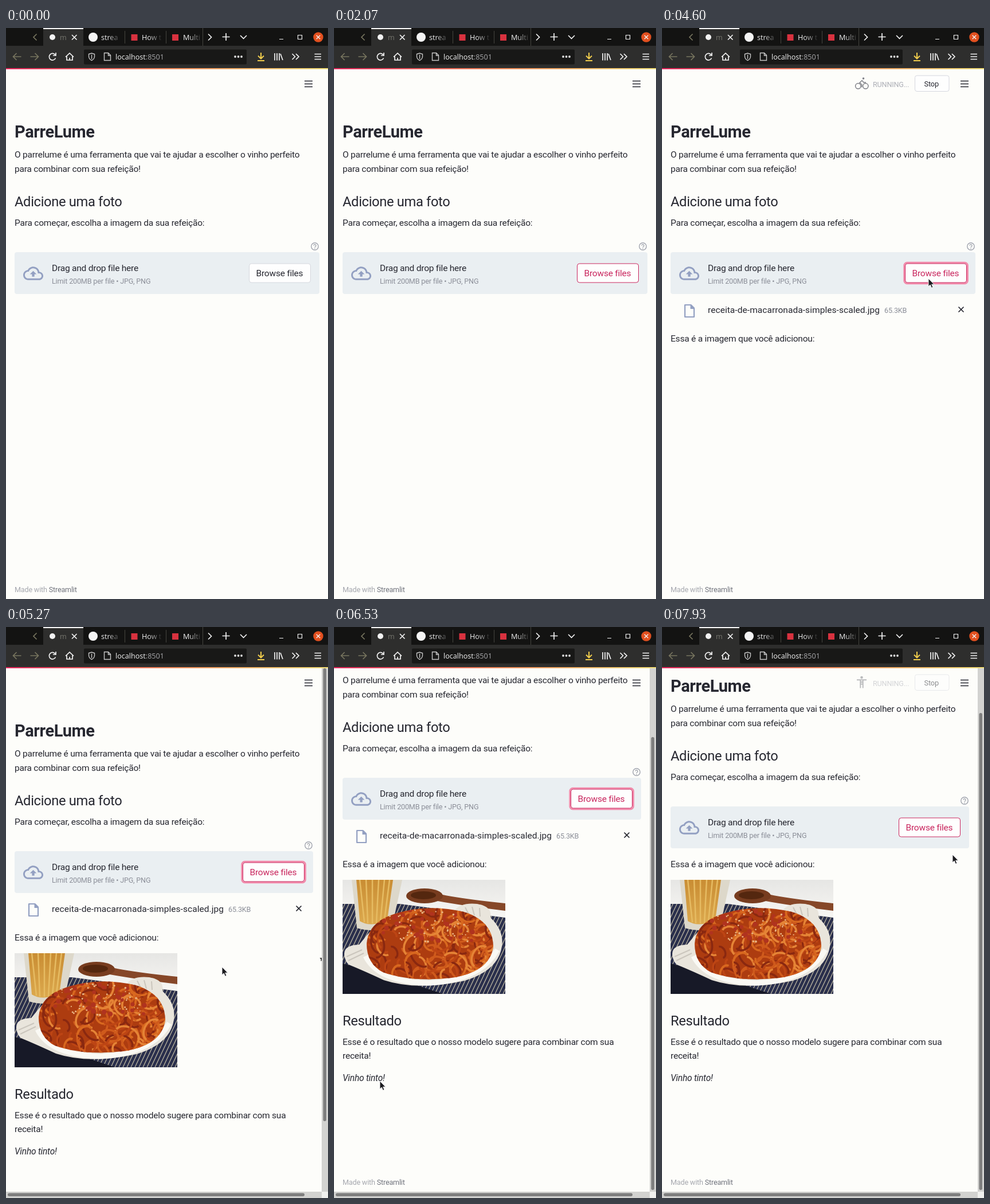
Animation, 562 px wide and 996 px high, one loop 8 s. Source, as an HTML page:

```html
<!DOCTYPE html>
<html lang="pt">
<head>
<meta charset="utf-8">
<title>ParreLume</title>
<style>
html, body { margin: 0; width: 100%; height: 100%; overflow: hidden; background: #fdfdfa; }
svg.stage { display: block; width: 100vw; height: 100vh; }
text { font: 15.5px Roboto, "Liberation Sans", sans-serif; letter-spacing: -.014em; fill: #262730; white-space: pre; }
.h1 { font-size: 29px; font-weight: 700; }
.h2 { font-size: 23.7px; }
.file { letter-spacing: .004em; }
.small { font-size: 12.6px; fill: #8b8e98; }
.ui { font: 12.6px "Open Sans", "Noto Sans", sans-serif; letter-spacing: 0; fill: #f2f2f2; }
.line { fill: none; stroke: #f2f2f2; stroke-width: 1.7; }
.dim { stroke: #77755f; }
.hot #btn rect { stroke: #c9265e; }
.hot #btn text { fill: #c9265e; }
</style>
</head>
<body>
<svg class="stage" viewBox="0 0 562 996" preserveAspectRatio="none">
  <defs>
    <linearGradient id="glow"><stop stop-color="#e8275f"/><stop offset=".5" stop-color="#f58a5c"/><stop offset="1" stop-color="#f3df78"/></linearGradient>
    <linearGradient id="fade"><stop stop-color="#131312" stop-opacity="0"/><stop offset="1" stop-color="#131312"/></linearGradient>
    <linearGradient id="wall" x2="0" y2="1"><stop stop-color="#e6e6e4"/><stop offset=".3" stop-color="#f6f5f2"/></linearGradient>
    <linearGradient id="noodles" x2="0" y2="1"><stop stop-color="#c98d33"/><stop offset="1" stop-color="#dca94e"/></linearGradient>
    <clipPath id="frame"><rect width="284" height="199"/></clipPath>
    <clipPath id="heap"><path d="M42 112Q44 74 92 59Q150 41 212 56Q262 72 263 116Q258 160 190 171Q120 179 70 161Q42 146 42 112Z"/></clipPath>
    <clipPath id="mat"><path d="M0 42H100L284 66V199H0Z"/></clipPath>
  </defs>
  <rect width="562" height="996" fill="#fdfdfa"/>

  <g id="page">
    <text class="h1" x="15" y="191">ParreLume</text>
    <text x="15" y="226">O parrelume é uma ferramenta que vai te ajudar a escolher o vinho perfeito</text>
    <text x="15" y="250.5">para combinar com sua refeição!</text>
    <text class="h2" x="15" y="311">Adicione uma foto</text>
    <text x="15" y="345">Para começar, escolha a imagem da sua refeição:</text>
    <rect id="zone" x="15" y="391" width="532" height="73" rx="4" fill="#eaeff2"/>
    <path transform="translate(30 410.5) scale(1.46)" fill="#93a0c2" d="M19.35 10.04C18.67 6.59 15.64 4 12 4 9.11 4 6.6 5.64 5.35 8.04 2.34 8.36 0 10.91 0 14c0 3.31 2.69 6 6 6h13c2.76 0 5-2.24 5-5 0-2.64-2.05-4.78-4.65-4.96zM19 18H6c-2.21 0-4-1.79-4-4s1.79-4 4-4h.71C7.37 7.69 9.48 6 12 6c3.04 0 5.5 2.46 5.5 5.5v.5H19c1.66 0 3 1.34 3 3s-1.34 3-3 3zM8 13h2.55v3h2.9v-3H16l-4-4z"/>
    <text x="80" y="424">Drag and drop file here</text>
    <text class="small" x="80" y="446">Limit 200MB per file • JPG, PNG</text>
    <g id="side">
      <circle cx="539" cy="381" r="6.2" fill="none" stroke="#a0a4ae" stroke-width="1.4"/>
      <path d="M537 379.6a2 2 0 1 1 3.2 1.6q-1.2 .8-1.2 1.8M539 384v1.4" fill="none" stroke="#a0a4ae" stroke-width="1.3"/>
      <rect id="ring" x="422.8" y="409.3" width="110.6" height="36.4" rx="5" fill="none" stroke="#f28bab" stroke-width="3"/>
      <g id="btn">
        <rect x="424.5" y="411" width="107" height="33" rx="4" fill="#fefefe" stroke="#d5d7de"/>
        <text x="436.5" y="433">Browse files</text>
      </g>
    </g>
    <g id="row">
      <path d="M40 483H50.5L56 488.5V504H40Z" fill="none" stroke="#93a0c2" stroke-width="2.2" stroke-linejoin="round"/>
      <path d="M49.5 482.5V490H57Z" fill="#93a0c2"/>
      <text class="file" x="80" y="497">receita-de-macarronada-simples-scaled.jpg</text>
      <text class="small" x="388" y="496.5">65.3KB</text>
      <path id="drop" d="M517.5 486.5l9 9m0-9l-9 9" stroke="#262730" stroke-width="1.7"/>
    </g>
    <g id="after">
      <text id="added" x="15" y="546.5">Essa é a imagem que você adicionou:</text>
      <g id="photo" transform="translate(15 569)" clip-path="url(#frame)">
        <rect width="284" height="199" fill="url(#wall)"/>
        <g clip-path="url(#mat)"><rect width="284" height="199" fill="#2a2f4c"/><g id="slats" stroke="#b9b4a0" stroke-width="1.3"/></g>
        <path d="M0 146L40 156L130 184L175 199H0Z" fill="#171927"/>
        <path d="M16 0H104L86 84Q50 92 25 84Z" fill="#ddd8ca"/>
        <path d="M24 0H88L78 70Q50 84 30 72Z" fill="url(#noodles)"/>
        <path d="M30 0L38 74M41 0L44 76M52 0V76M63 0L59 75M73 0L66 73M82 0L73 70" stroke="#e6bb62" stroke-width="2.5"/>
        <path d="M165 24Q205 33 284 41V54Q215 46 160 36Z" fill="#864728"/>
        <ellipse cx="143" cy="28" rx="32" ry="13" fill="#773c1f"/>
        <ellipse cx="141" cy="27" rx="22" ry="7" fill="#54270f"/>
        <path d="M3 130Q2 114 29 113L43 96Q82 50 195 54Q206 39 235 42Q262 47 258 66Q282 88 278 116Q272 158 213 176Q130 194 72 175Q40 160 11 148Q4 142 3 130Z" fill="#e9e5dc"/>
        <path d="M40 133Q62 178 150 180Q240 176 270 122" fill="none" stroke="#faf9f4" stroke-width="9"/>
        <path d="M7 134L34 122M10 141L37 128M214 48L220 60M226 47L230 62M239 49L240 64" stroke="#cbc6bd" stroke-width="2"/>
        <g clip-path="url(#heap)"><rect width="284" height="199" fill="#ad3c10"/><g id="pasta" fill="none"/></g>
      </g>
      <g id="result">
        <text class="h2" x="15" y="823">Resultado</text>
        <text x="15" y="857">Esse é o resultado que o nosso modelo sugere para combinar com sua</text>
        <text x="15" y="880.5">receita!</text>
        <text x="15" y="920" style="font-style:italic">Vinho tinto!</text>
      </g>
    </g>
    <path id="speck" d="M547.5 577h3.5v5l-1.5 1v-3.5z" fill="#333"/>
    <text class="small" id="foot" x="15" y="984" style="fill:#a5a7ae">Made with <tspan fill="#71747d">Streamlit</tspan></text>
  </g>

  <g id="bars">
    <path d="M551 72H562V996H0V985H551Z" fill="#d2d2d0"/>
    <rect x="551" y="985" width="11" height="11" fill="#f0f0ee"/>
    <rect id="thumb" x="553.5" y="72" width="5.5" height="790" rx="2.7" fill="#7e7e7e"/>
    <rect x="3" y="987.5" width="518" height="5.5" rx="2.7" fill="#7e7e7e"/>
  </g>

  <path d="M521 92.5H535M521 97.5H535M521 102.5H535" stroke="#262730" stroke-width="1.7"/>
  <g id="run">
    <g id="bike" fill="none" stroke="#7d7f86" stroke-width="1.5">
      <circle cx="342.3" cy="101.3" r="4.7"/><circle cx="355.3" cy="101.3" r="4.7"/>
      <path d="M348.6 103.5V98.5L345 95.5L349 91.5L352 95H356"/>
      <circle cx="351.5" cy="88" r="1.8" fill="#7d7f86" stroke="none"/>
    </g>
    <g id="man" fill="none" stroke="#7d7f86" stroke-width="1.9">
      <circle cx="348.5" cy="88" r="2.3" fill="#7d7f86" stroke="none"/>
      <path d="M340 92.3H357M346.3 92V106.5M350.7 92V106.5M346.3 96H350.7M346.3 99.5H350.7"/>
    </g>
    <text class="small" x="368" y="103" style="fill:#adafb6">RUNNING...</text>
    <rect x="441.5" y="83" width="59.5" height="27.5" rx="3.5" fill="#fefefe" stroke="#d5d7de"/>
    <text x="457.5" y="101.5" style="font-size:12.8px">Stop</text>
  </g>

  <g id="chrome">
    <rect width="562" height="31" fill="#131312"/>
    <rect y="31" width="562" height="39" fill="#2e2e2d"/>
    <rect x="65" width="70" height="31" fill="#2e2e2d"/>
    <rect x="65" width="70" height="2" fill="#f4f4f4"/>
    <rect y="70" width="562" height="2" fill="url(#glow)"/>
    <rect x="136" y="37.5" width="284" height="26" rx="2" fill="#181817"/>
    <path class="line dim" d="M53.5 10.5L48 16L53.5 21.5"/>
    <circle cx="81" cy="16" r="5" fill="#f2f2f2"/>
    <text class="ui" x="94" y="20.5" style="fill:#77776f">m</text>
    <path class="line" d="M115 12l8.5 8.5m0-8.5l-8.5 8.5"/>
    <circle cx="152" cy="16" r="8" fill="#f4f4f4"/>
    <text class="ui" x="166" y="20.5">strea</text>
    <rect x="177" y="5" width="24" height="22" fill="url(#fade)"/>
    <rect x="218.5" y="11" width="11" height="11" fill="#d8323f"/>
    <text class="ui" x="237" y="20.5">How t</text>
    <rect x="248" y="5" width="25" height="22" fill="url(#fade)"/>
    <rect x="290" y="11" width="11" height="11" fill="#d8323f"/>
    <text class="ui" x="309" y="20.5">Multi</text>
    <rect x="319" y="5" width="24" height="22" fill="url(#fade)"/>
    <path d="M207.5 5V27M279.5 5V27M343.5 0V31" stroke="#45453f"/>
    <path class="line" d="M353 10.5L358.5 16L353 21.5M377.5 15.5H390.5M384 9V22M409 13L414.5 18.5L420 13"/>
    <path class="line" d="M477 19.5H484M509.5 12.5H516.5V19.5H509.5Z" style="stroke-width:1.2"/>
    <circle cx="545" cy="16" r="8.7" fill="#e2501f"/>
    <path class="line" d="M541.7 12.7l6.6 6.6m0-6.6l-6.6 6.6" style="stroke-width:1.4"/>
    <path class="line dim" d="M26.5 50H12.5M18.5 44L12.5 50L18.5 56M42.5 50H56.5M50.5 44L56.5 50L50.5 56"/>
    <path class="line" d="M86 47A5.8 5.8 0 1 0 86.5 52.5M87 43V48H82M104 50.5L111 44L118 50.5M106 49.5V56H116V49.5M111 56V52"/>
    <path class="line" d="M144.5 45.5L149.5 44L154.5 45.5V50Q154 54.5 149.5 56.5Q145 54.5 144.5 50ZM149.5 46.5V54" style="stroke:#c6c6c6;stroke-width:1.4"/>
    <path class="line" d="M171.5 43.5H178.5L182.5 47.5V56.5H171.5ZM178.5 44V48H182" style="stroke:#c6c6c6;stroke-width:1.4"/>
    <text class="ui" x="191" y="55">localhost<tspan fill="#a8a8ab">:8501</tspan></text>
    <path d="M400 50h.01M405.5 50h.01M411 50h.01" stroke="#ddd" stroke-width="3.8" stroke-linecap="round"/>
    <path class="line" d="M445 43V53M440 48.5L445 53.5L450 48.5M439 57H451" style="stroke:#f0cc4c;stroke-width:2"/>
    <path class="line" d="M469 44V56.5M473 44V56.5M477 44V56.5M479 45L483 56M499.5 45L504.5 50L499.5 55M506 45L511 50L506 55M538.5 45.5H550M538.5 50H550M538.5 54.5H550"/>
  </g>

  <path id="cursor" d="M0 0V14L3.2 11L5.5 16.3L7.9 15.2L5.7 10.2H10Z" fill="#1b1b1f" stroke="#fff" stroke-width=".9"/>
</svg>
<script>
const LOOP = 8000, FPS = 15;
const $ = id => document.getElementById(id);
const show = (id, on) => { $(id).style.display = on ? "" : "none"; };
const move = (id, x, y) => $(id).setAttribute("transform", `translate(${x} ${y})`);

// [time, x, y]
const pointer = [
  [470, 393, -9], [600, 393, -9], [670, 385, 4], [870, 320, 110], [1070, 200, 250], [1270, 130, 318],
  [1400, 130, 318], [1600, 230, 362], [1800, 395, 418], [2000, 465, 437],
  [2870, 29, 116], [2930, 29, 116], [3130, 120, 104], [3330, 203, 97], [3530, 203, 97], [3600, 401, 98],
  [4200, 465, 437], [4870, 465, 437], [5070, 415, 530], [5270, 377, 593],
  [6000, 377, 593], [6270, 180, 730], [6470, 80, 792], [6670, 150, 900], [6870, 332, 820],
  [7000, 420, 600], [7130, 505, 410], [7200, 514.5, 377], [7330, 511, 364],
  [7530, 511, 364], [7730, 507, 397]
];
const scroll = [[5330, 0], [5470, 128], [7530, 128], [7600, 78]];
const shown = [[470, 2070], [2930, 3670], [4270, LOOP]];

function at(keys, t, n = 1) {
  const i = keys.findIndex(k => k[0] > t);
  if (i === 0) return keys[0][n];
  if (i < 0) return keys[keys.length - 1][n];
  const a = keys[i - 1], b = keys[i];
  return a[n] + (b[n] - a[n]) * (t - a[0]) / (b[0] - a[0]);
}

function drawPhoto() {
  let seed = 11;
  const rnd = (a, b) => a + (b - a) * ((seed = seed * 16807 % 2147483647) / 2147483647);
  const tones = ["#d8681f", "#bd4514", "#e58436", "#8a2810", "#cf5a1c"];
  let slats = "", pasta = "";
  for (let i = -14; i < 50; i++) slats += `<path d="M${i * 7} 199L${i * 7 + 75} 40"/>`;
  for (let i = 0; i < 150; i++) {
    const x = rnd(40, 265), y = rnd(52, 174), r = rnd(9, 24), turn = rnd(0, 360);
    pasta += `<path transform="translate(${x} ${y}) rotate(${turn})" d="M${-r} 0A${r} ${r * .7} 0 0 1 ${r} ${r * .2}" stroke="${tones[i % 5]}" stroke-width="3.6"/>`;
  }
  for (let i = 0; i < 40; i++)
    pasta += `<circle cx="${rnd(65, 230)}" cy="${rnd(52, 108)}" r="${rnd(2, 5)}" fill="#b0331f"/>`;
  for (let i = 0; i < 60; i++)
    pasta += `<circle cx="${rnd(75, 225)}" cy="${rnd(52, 108)}" r="${rnd(.7, 1.9)}" fill="#e9b483"/>`;
  $("slats").innerHTML = slats;
  $("pasta").innerHTML = pasta;
}

function draw(t) {
  const tall = t >= 4800, gone = t >= 7600, y = at(scroll, t), dx = tall ? -11 : 0;
  document.body.className = t >= 1930 ? "hot" : "";
  move("page", 0, -y);
  move("side", dx, 0);
  move("drop", dx, 0);
  move("after", 0, gone ? -50 : 0);
  $("zone").setAttribute("width", 532 + dx);
  $("foot").setAttribute("y", tall ? (gone ? 1051 : 1101) : 984);
  show("ring", t >= 4200 && t < 7530);
  show("row", t >= 4330 && !gone);
  show("added", t >= 4530);
  show("photo", t >= 4670);
  show("result", tall);
  show("speck", t >= 5070 && t < 6470);

  show("bars", tall);
  $("thumb").setAttribute("y", gone ? 150 : 72 + y * .9375);
  $("thumb").setAttribute("height", gone ? 832 : 790);

  const again = t > 6000, age = t - (again ? 7730 : 4330);
  show("run", age >= 0 && (t < 5000 || again));
  $("run").style.opacity = Math.max(0, Math.min(1, age / 270));
  show("man", age < 220);
  show("bike", age >= 220);

  show("cursor", shown.some(([a, b]) => t >= a && t < b));
  move("cursor", at(pointer, t, 1), at(pointer, t, 2));
}

drawPhoto();
const start = performance.now();
function tick() {
  const t = (performance.now() - start) % LOOP;
  draw(Math.round(Math.floor(t * FPS / 1000) * 100 / FPS) * 10);
  requestAnimationFrame(tick);
}
tick();
</script>
</body>
</html>
```
